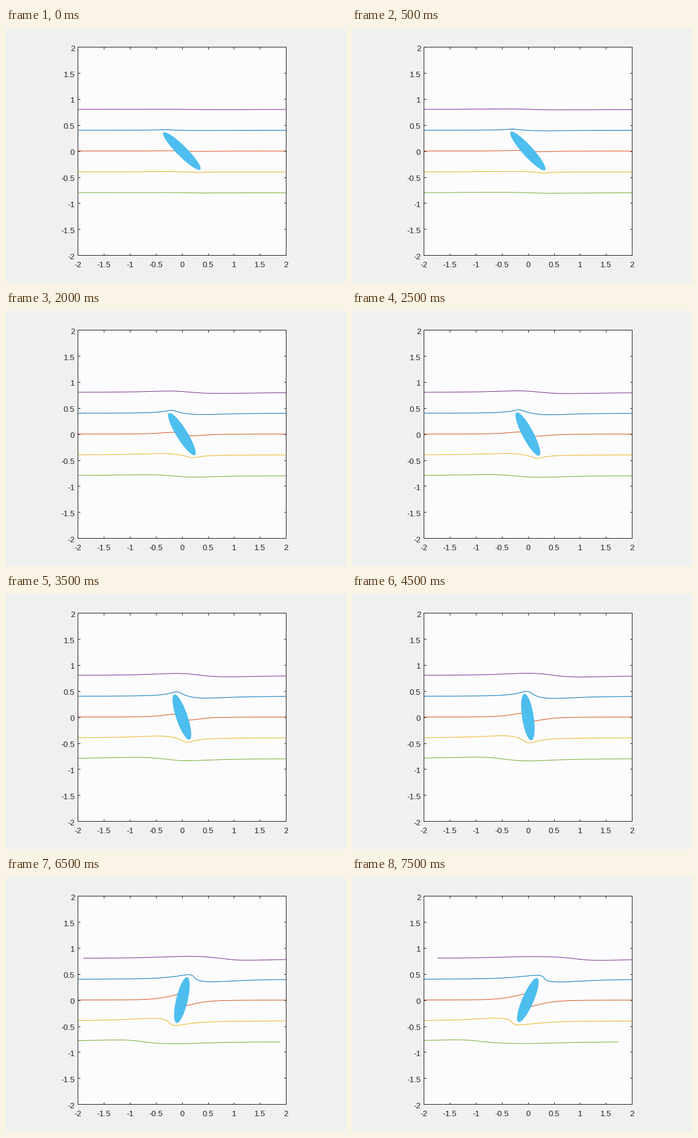
Recreate the animation shown at these times as a matplotlib script. Size 560x420 px, loop 8000 ms.

```python
import numpy as np
import matplotlib.pyplot as plt
from matplotlib.animation import FuncAnimation
from matplotlib.transforms import ScaledTranslation

plt.rcParams["font.family"] = "Liberation Sans"
plt.rcParams["axes.unicode_minus"] = False

W, H, DPI = 560, 420, 100
PX = 72 / DPI              # one pixel in points
FRAMES, INTERVAL = 16, 500
STEP = 0.1                 # shear strain per frame
VISC = 10                  # viscosity ratio inclusion / matrix
AREA = 0.05                # product of the semi-axes
INK = "#262626"

LINES = [(0.4, "#0072bd"), (0.0, "#d95319"), (-0.4, "#edb120"),
         (0.8, "#7e2f8e"), (-0.8, "#77ac30")]


def axes_of(kappa):
    return np.sqrt(AREA * kappa), np.sqrt(AREA / kappa)


def rates(theta, kappa):
    """Strain jump, spin jump, rotation rate and stretch rate of the inclusion."""
    e = 0.5j * np.exp(-2j * theta)
    k2 = kappa ** 2 + 1
    normal = (1 + kappa) ** 2 / (k2 + 2 * VISC * kappa)
    shear = (1 + kappa) ** 2 / (2 * kappa + VISC * k2)
    inner = complex(e.real * normal, e.imag * shear)
    jump = inner - e
    ratio = (kappa ** 2 - 1) / k2
    spin = -ratio * jump.imag
    return jump, spin, -0.5 + spin + inner.imag / ratio, inner.real


def velocity(z, theta, kappa):
    """Simple shear plus the Stokes disturbance of a viscous ellipse."""
    a, b = axes_of(kappa)
    jump, spin, _, _ = rates(theta, kappa)
    zz = z * np.exp(-1j * theta)
    inside = (zz.real / a) ** 2 + (zz.imag / b) ** 2 < 1

    r, k = (a + b) / 2, (a - b) / (a + b)
    c = np.sqrt(a * a - b * b)
    zeta = (zz + np.sqrt(zz - c) * np.sqrt(zz + c)) / (2 * r)
    alpha = r * (1j * spin + jump * k)
    beta = r * (1j * spin * k + jump)
    phi = beta / zeta
    dphi = -beta / (r * (zeta ** 2 - k))
    psi = -np.conj(alpha) / zeta + beta * (1 + k * zeta ** 2) / (zeta * (zeta ** 2 - k))
    outer = phi - zz * np.conj(dphi) - np.conj(psi)
    inner = 1j * spin * zz + jump * np.conj(zz)
    return z.imag + np.where(inside, inner, outer) * np.exp(1j * theta)


def simulate():
    theta, kappa = 0.75 * np.pi, 5.0
    x = np.linspace(-3, 3, 601)
    z = np.array([x + 1j * y for y, _ in LINES])
    turn = np.linspace(0, 2 * np.pi, 121)
    states = []
    for _ in range(FRAMES):
        a, b = axes_of(kappa)
        rim = (a * np.cos(turn) + 1j * b * np.sin(turn)) * np.exp(1j * theta)
        z = z + STEP * velocity(z, theta, kappa)
        states.append((z, rim))
        _, _, rot, stretch = rates(theta, kappa)
        theta += STEP * rot
        kappa *= 1 + 2 * STEP * stretch
    return states


states = simulate()

fig = plt.figure(figsize=(W / DPI, H / DPI), dpi=DPI, facecolor="#f0f0f0")
ax = fig.add_axes([118.2 / W, 45.8 / H, 343 / W, 343 / H], facecolor="#fcfcfe")
ax.set(xlim=(-2, 2), ylim=(-2, 2))
ticks = np.arange(-2, 2.1, 0.5)
labels = [f"{t:g}" for t in ticks]
ax.set_xticks(ticks, labels)
ax.set_yticks(ticks, labels)
ax.tick_params(direction="in", top=True, right=True, length=3.5 * PX, width=PX,
               color=INK, labelcolor=INK, labelsize=13.3 * PX)
ax.tick_params(axis="x", pad=11 * PX)
ax.tick_params(axis="y", pad=5 * PX)
drop = ScaledTranslation(0, -2 / DPI, fig.dpi_scale_trans)
for label in ax.get_yticklabels():
    label.set_transform(label.get_transform() + drop)
for spine in ax.spines.values():
    spine.set(linewidth=PX, edgecolor=INK)

curves = [ax.plot([], [], color=color, lw=PX)[0] for _, color in LINES]
body, = ax.fill([0, 0, 0], [0, 0, 0], color="#4dbeee", lw=0, zorder=2.4)


def draw(i):
    z, rim = states[i]
    for curve, pts in zip(curves, z):
        curve.set_data(pts.real, pts.imag)
    body.set_xy(np.column_stack([rim.real, rim.imag]))
    return [*curves, body]


body.set_zorder(3)
anim = FuncAnimation(fig, draw, frames=FRAMES, init_func=lambda: draw(0),
                     interval=INTERVAL, repeat=True, repeat_delay=0)
plt.show()
```
